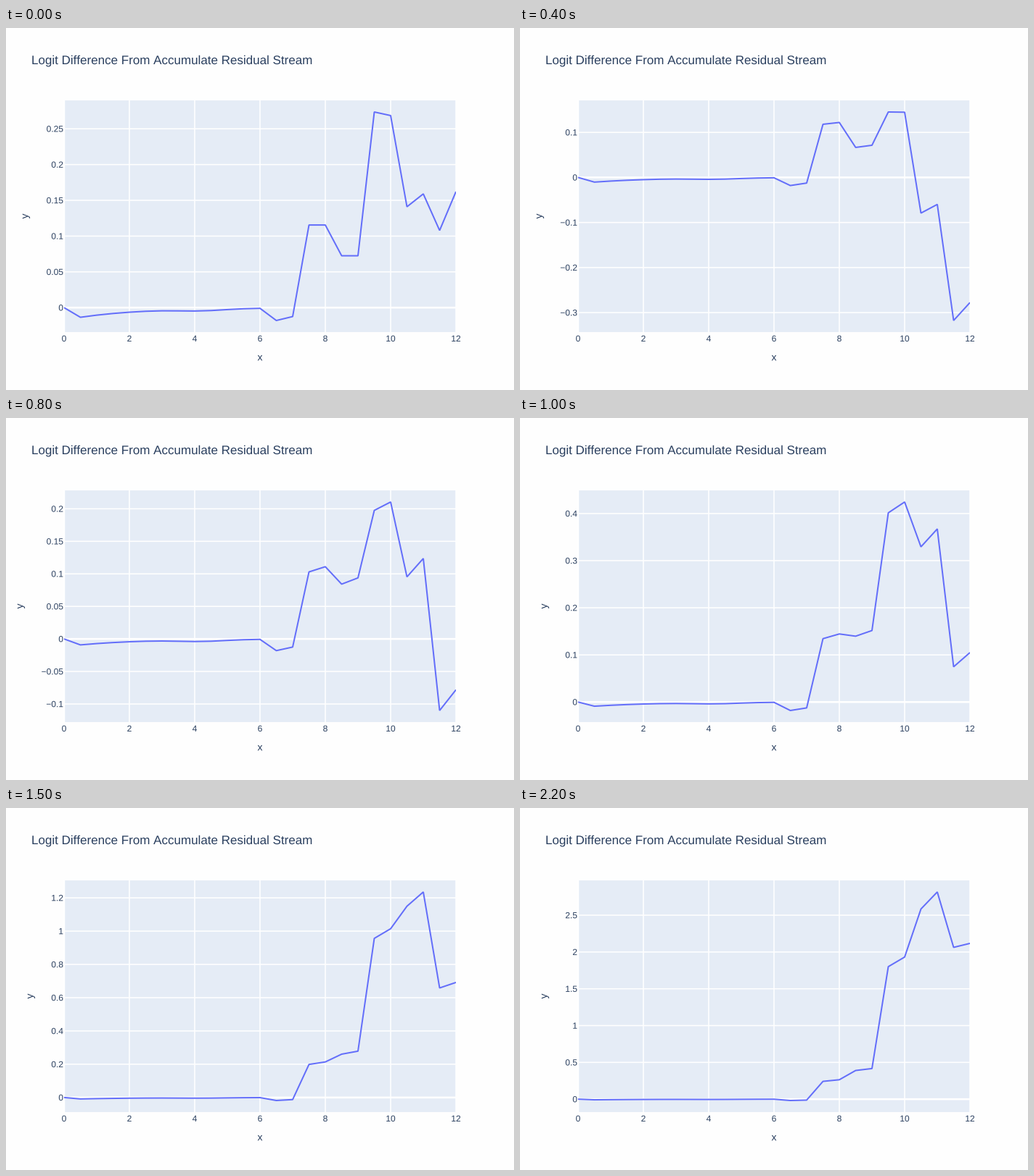
These frames come from a looping animation (700x500 px, 2.3 s). A matplotlib script:

```python
import math

import matplotlib.pyplot as plt
import numpy as np
from matplotlib.animation import FuncAnimation
from matplotlib.patches import PathPatch, Rectangle
from matplotlib.textpath import TextPath
from matplotlib.transforms import Affine2D

W, H, FRAMES, INTERVAL = 700, 500, 23, 100
LEFT, RIGHT, TOP, BOTTOM = 80, 620, 100, 420
PX = 0.72  # points per pixel at 100 dpi
INK, LINE, PANEL, PAPER = "#2a3f5f", "#636efa", "#e5ecf6", "#fefefe"
GRID, ZERO = 1.6, 2.6

plt.rcParams.update({
    "font.family": "Liberation Sans",
    "text.kerning_factor": 6,  # plain advances, no pair kerning
    "path.simplify": False,
})

# Mean level of each late layer (7.5 to 11.5) at a few moments
KEYS = np.array([0, 4, 8, 12, 15, 22])
LEVELS = np.array([
    [.1155, .0725, .271, .150, .135],
    [.120, .069, .145, -.0695, -.2976],
    [.107, .089, .204, .1095, -.0941],
    [.1777, .2092, .667, .657, .3105],
    [.2063, .2695, .9854, 1.1925, .675],
    [.253, .403, 1.866, 2.70, 2.09],
])
SLOPES = np.gradient(LEVELS, KEYS, axis=0, edge_order=2)


def levels(t):
    """Cubic Hermite path through the key levels."""
    k = min(np.searchsorted(KEYS, t, side="right") - 1, len(KEYS) - 2)
    span = KEYS[k + 1] - KEYS[k]
    u = (t - KEYS[k]) / span
    ease = u * u * (3 - 2 * u)
    return ((1 - ease) * LEVELS[k] + ease * LEVELS[k + 1]
            + span * u * (1 - u) ** 2 * SLOPES[k]
            - span * u * u * (1 - u) * SLOPES[k + 1])


def rises(t):
    """Gain within each late layer."""
    return np.array([.001 * t, .0012 * t, .00028 * t ** 2 - .005,
                     .018 + .00002 * t ** 3, .03 + .0002 * (t - 11) ** 2])


def curve(t):
    x = np.arange(.5, 6.1, .5)
    sag = .0085 + .005 * math.exp(-t / 4)
    early = -sag * np.exp((.5 - x) / 2) - .0025 * np.exp(-(x - 4.2) ** 2)
    mid, half = levels(t), rises(t) / 2
    late = np.column_stack([mid - half, mid + half]).ravel()
    return np.concatenate([[0], early, [-.018, -.0125], late])


def tick_step(span):
    rough = span / 9
    base = 10 ** math.floor(math.log10(rough))
    return next(m for m in (1, 2, 5, 10) if rough <= m * base * (1 + 1e-9)) * base


def tick_label(value):
    return f"{round(value, 6) + 0:g}".replace("-", "\u2212")


def advance(text, size):
    narrow = {".": .278, "\u2212": .584, "x": .5, "y": .5}
    return size * sum(narrow.get(c, .556) for c in text)


def glyphs(text, size, x, y, anchor=0.0, angle=0):
    """Outline of text on baseline y; anchor is the share left of x."""
    shift = -anchor * advance(text, size)
    place = Affine2D().translate(shift, 0).scale(1, -1).rotate_deg(angle)
    return place.translate(x, y).transform_path(TextPath((0, 0), text, size=size))


fig = plt.figure(figsize=(W / 100, H / 100), dpi=100, facecolor=PAPER)
ax = fig.add_axes([0, 0, 1, 1])
ax.set(xlim=(0, W), ylim=(H, 0))
ax.axis("off")
panel = ax.add_patch(Rectangle((LEFT, TOP), RIGHT - LEFT, BOTTOM - TOP,
                               fc=PANEL, ec="none", zorder=0))


def rule(xs, ys, width):
    line, = ax.plot(xs, ys, color="white", lw=width * PX, zorder=1,
                    solid_capstyle="butt", snap=False)
    return line


def write(*args, **kw):
    return ax.add_patch(PathPatch(glyphs(*args, **kw), fc=INK, ec="none",
                                  zorder=4, snap=False))


for n in range(0, 13, 2):
    x = LEFT + 45 * n
    rule([x, x], [TOP, BOTTOM], GRID if n else ZERO)
    write(str(n), 12, x, 433, anchor=.5)

write("Logit Difference From Accumulate Residual Stream", 17, 35, 50)
write("x", 14, 350, 459.3, anchor=.5)
y_title = write("y", 14, 30, 260, anchor=.5, angle=-90)

rules = [rule([LEFT, RIGHT], [TOP, TOP], GRID) for _ in range(11)]
labels = [write("0", 12, 79, TOP, anchor=1) for _ in rules]
trace, = ax.plot([], [], color=LINE, lw=2 * PX, zorder=3,
                 solid_joinstyle="bevel", solid_capstyle="butt")
trace.set_clip_path(panel)


def draw(i):
    ys = curve(i)
    pad = np.ptp(ys) / 18
    low, high = ys.min() - pad, ys.max() + pad

    def to_px(v):
        return BOTTOM - (v - low) / (high - low) * (BOTTOM - TOP)

    trace.set_data(np.linspace(LEFT, RIGHT, len(ys)), to_px(ys))

    step = tick_step(high - low)
    ticks = range(math.ceil(low / step), math.floor(high / step) + 1)
    for artist in rules + labels:
        artist.set_visible(False)
    widest = 0
    for n, line, label in zip(ticks, rules, labels):
        y, text = to_px(n * step), tick_label(n * step)
        line.set(ydata=[y, y], linewidth=(GRID if n else ZERO) * PX, visible=True)
        label.set_path(glyphs(text, 12, 79, y + 4.2, anchor=1))
        label.set_visible(True)
        widest = max(widest, advance(text, 12))
    y_title.set_path(glyphs("y", 14, 54.2 - math.ceil(widest), 260,
                            anchor=.5, angle=-90))
    return [trace, y_title, *rules, *labels]


anim = FuncAnimation(fig, draw, frames=FRAMES, interval=INTERVAL,
                     repeat=True, repeat_delay=0, blit=False)
plt.show()
```
